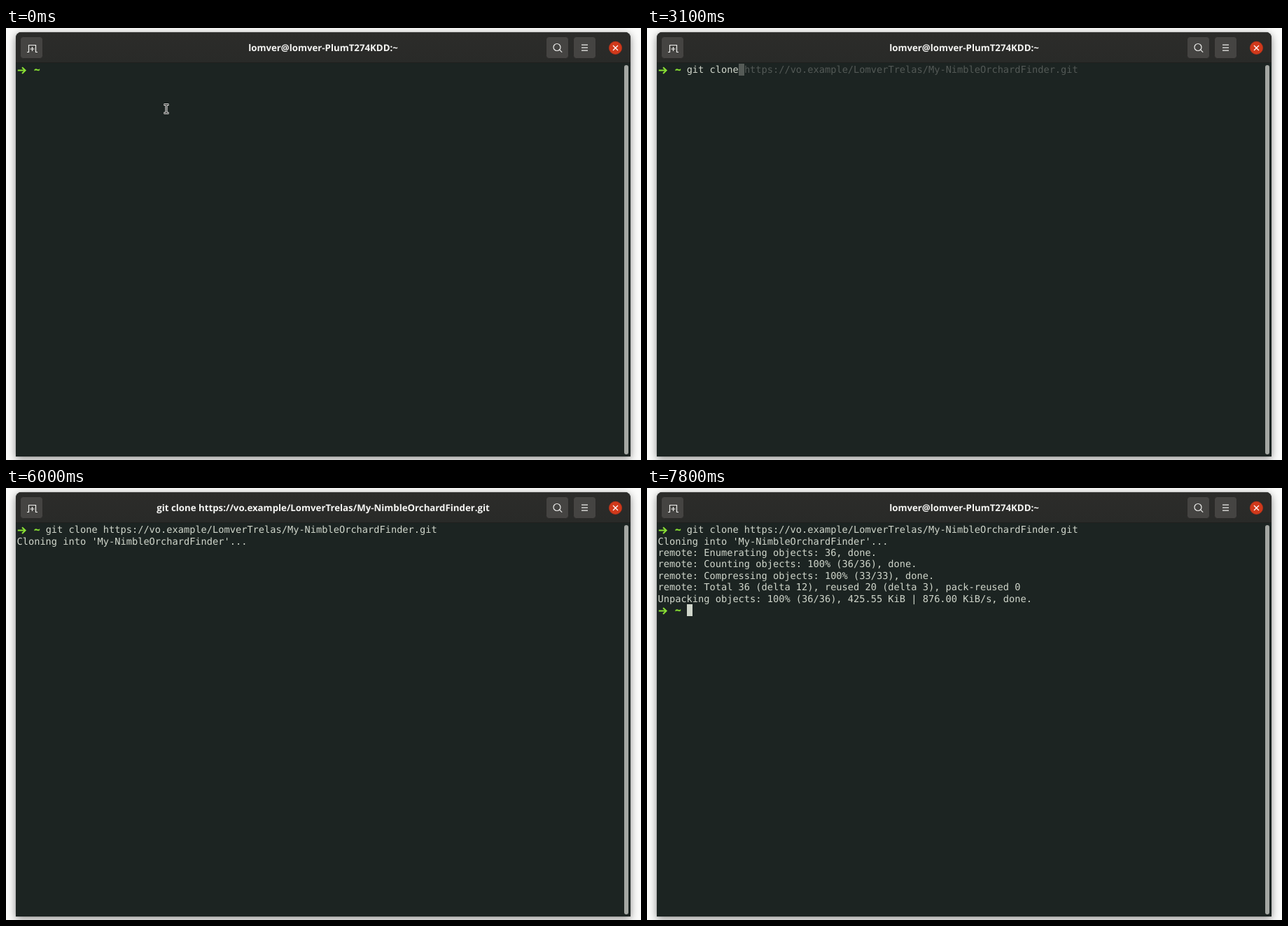
Recreate the animation shown at these times as an HTML page. Size 907 by 617 pixels, loop 8 s.

```html
<!DOCTYPE html>
<html lang="en">
<head>
<meta charset="utf-8">
<title>Terminal</title>
<style>
  html, body { margin: 0; width: 100%; height: 100%; overflow: hidden; }
  body { position: relative; background: #fbfbfa; }
  .window, .shadow {
    position: absolute; left: 14px; top: 6px; width: 878px; height: 606px;
    border-radius: 8px 8px 0 0;
  }
  .window { background: #1c2422; overflow: hidden; }
  .shadow { box-shadow: 0 3px 12px rgba(0, 0, 0, .45), 0 0 1px rgba(0, 0, 0, .5); }
  .bar {
    height: 44px; box-sizing: border-box; border-bottom: 1px solid #1f201e;
    background: linear-gradient(#2c2c2a, #292a28); box-shadow: inset 0 1px #363634;
  }
  .title {
    position: absolute; left: 0; width: 100%; top: 12px; text-align: center;
    font: bold 13.25px/20px "Open Sans", "Noto Sans", sans-serif; color: #f5f5f3;
    text-rendering: geometricPrecision; white-space: pre;
  }
  .scroll {
    position: absolute; left: 869px; top: 47px; width: 6px; height: 556px;
    border-radius: 3px; background: #a4a7a3;
  }
  svg { position: absolute; left: 0; top: 0; }
  .term {
    --cell: 8.226px; --line: 16.43px;
    position: absolute; left: 15.5px; top: 51.2px;
    font: 13.663px "DejaVu Sans Mono", monospace;
    color: #d0d6cb; white-space: pre; text-rendering: geometricPrecision;
    font-variant-ligatures: none;
  }
  /* The taller line box sets the baseline low in each cell. */
  .row, .block { position: absolute; height: var(--line); line-height: calc(var(--line) + 2.2px); }
  .ghost { color: #535956; }
  .block { width: var(--cell); background: #d0d6cb; color: #1c2422; }
  .block.dim { background: #555b57; }
  .prompt { font-weight: bold; color: #8ae234; -webkit-text-stroke: .5px #8ae234; }
  .prompt svg { top: .4px; fill: none; stroke: #8ae234; stroke-width: 2; }
</style>
</head>
<body>
<div class="shadow"></div>
<div class="window">
  <div class="bar"></div>
  <div class="title" id="title"></div>
  <div class="scroll"></div>
</div>

<svg width="907" height="617" fill="none" stroke="#eeeeec" stroke-width="1.2">
  <g fill="#454442" stroke="#2a2928" stroke-width="1">
    <rect x="20.5" y="12.5" width="32" height="31" rx="4"/>
    <rect x="771.5" y="12.5" width="32" height="31" rx="4"/>
    <rect x="810.5" y="12.5" width="32" height="31" rx="4"/>
  </g>
  <path d="M30 34.5h2.5v-10h10v10h2.5M37.5 27v6M34.5 30h6"/>
  <circle cx="787" cy="27.5" r="5"/>
  <path d="M790.6 31.1l3.6 3.6"/>
  <path d="M822 24.2h9M822 28.2h9M822 32.2h9"/>
  <circle cx="870.5" cy="28.4" r="9.1" fill="#d0391b" stroke="#b5321a" stroke-width=".8"/>
  <path d="M867 25l7 7m0-7l-7 7" stroke="#fff" stroke-width="1.3"/>
  <g id="pointer">
    <path d="M225.5 109.5h7M225.5 121.5h7M229 109.5v12" stroke="#f2f2f0" stroke-width="3"/>
    <path d="M226 109.5h6M226 121.5h6M229 109.5v12" stroke="#111" stroke-width="1"/>
  </g>
</svg>

<div class="term" id="term"></div>

<script>
const LOOP = 8000, CELL = 8.226, LINE = 16.43, INDENT = 5;
const repo = 'My-NimbleOrchardFinder';
const cmd = `git clone https://vo.example/LomverTrelas/${repo}.git`;
const home = 'lomver@lomver-PlumT274KDD:~';

const cloning = [`Cloning into '${repo}'...`];
const counted = [...cloning,
  'remote: Enumerating objects: 36, done.',
  'remote: Counting objects: 100% (36/36), done.',
  'remote: Compressing objects: 100% (33/33), done.'];
const unpacking = [...counted, 'Unpacking objects:  44% (16/36)'];
const finished = [...counted,
  'remote: Total 36 (delta 12), reused 20 (delta 3), pack-reused 0',
  'Unpacking objects: 100% (36/36), 425.55 KiB | 876.00 KiB/s, done.'];

const type = n => ({ typed: n, at: [0, INDENT + n], on: true });
const on = { on: true }, off = { on: false };

// Each step changes only the named parts of the screen.
const steps = [
  [0, { ...type(0), on: false, out: [], title: home, pointer: true, done: false }],
  [300, on],
  [600, { ...type(1), pointer: false }],
  [800, type(2)], [1000, type(3)], [1300, type(4)],
  [1500, type(5)], [1600, type(6)], [1900, type(7)],
  [2300, type(8)], [2400, type(9)],
  [3000, off], [3100, on],
  [3500, type(cmd.length)],
  [3700, off], [4300, on], [4900, off],
  [5400, { title: cmd, at: [1, 0], on: true }],
  [5500, { out: cloning, at: [2, 0] }],
  [6000, off],
  [6300, { out: counted, at: [5, 0] }],
  [6500, { out: unpacking }],
  [6900, on],
  [7000, { out: finished, title: home, done: true, at: [7, INDENT] }],
  [7200, off], [7800, on],
];
const states = [];
for (const [t, change] of steps) states.push({ ...states.at(-1), ...change, t });

const $ = id => document.getElementById(id);
const spot = (row, col) => `left:${col * CELL}px;top:${row * LINE}px`;
const text = (row, col, s, cls = '') => `<div class="row ${cls}" style="${spot(row, col)}">${s}</div>`;
const arrow = '<svg width="14" height="17"><path d="M.8 8.6H11.5M7 4.2l4.6 4.4L7 13"/></svg>';
const prompt = row => text(row, 0, arrow, 'prompt') + text(row, 3, '~', 'prompt');

function render(s) {
  const hint = s.typed > 0 && s.typed < cmd.length;
  let html = prompt(0) + text(0, INDENT, cmd.slice(0, s.typed));
  if (hint) html += text(0, INDENT + s.typed, cmd.slice(s.typed), 'ghost');
  s.out.forEach((line, i) => html += text(i + 1, 0, line));
  if (s.done) html += prompt(7);
  if (s.on) {
    const [row, col] = s.at;
    const under = row ? s.out[row - 1]?.[col] : hint && cmd[s.typed];
    html += `<div class="block ${hint ? 'dim' : ''}" style="${spot(row, col)}">${under || ' '}</div>`;
  }
  $('term').innerHTML = html;
  $('title').textContent = s.title;
  $('pointer').style.display = s.pointer ? '' : 'none';
}

const start = performance.now();
let shown;
function tick() {
  const t = (performance.now() - start) % LOOP;
  const state = states.findLast(s => s.t <= t);
  if (state !== shown) render(shown = state);
  requestAnimationFrame(tick);
}
tick();
</script>
</body>
</html>
```
